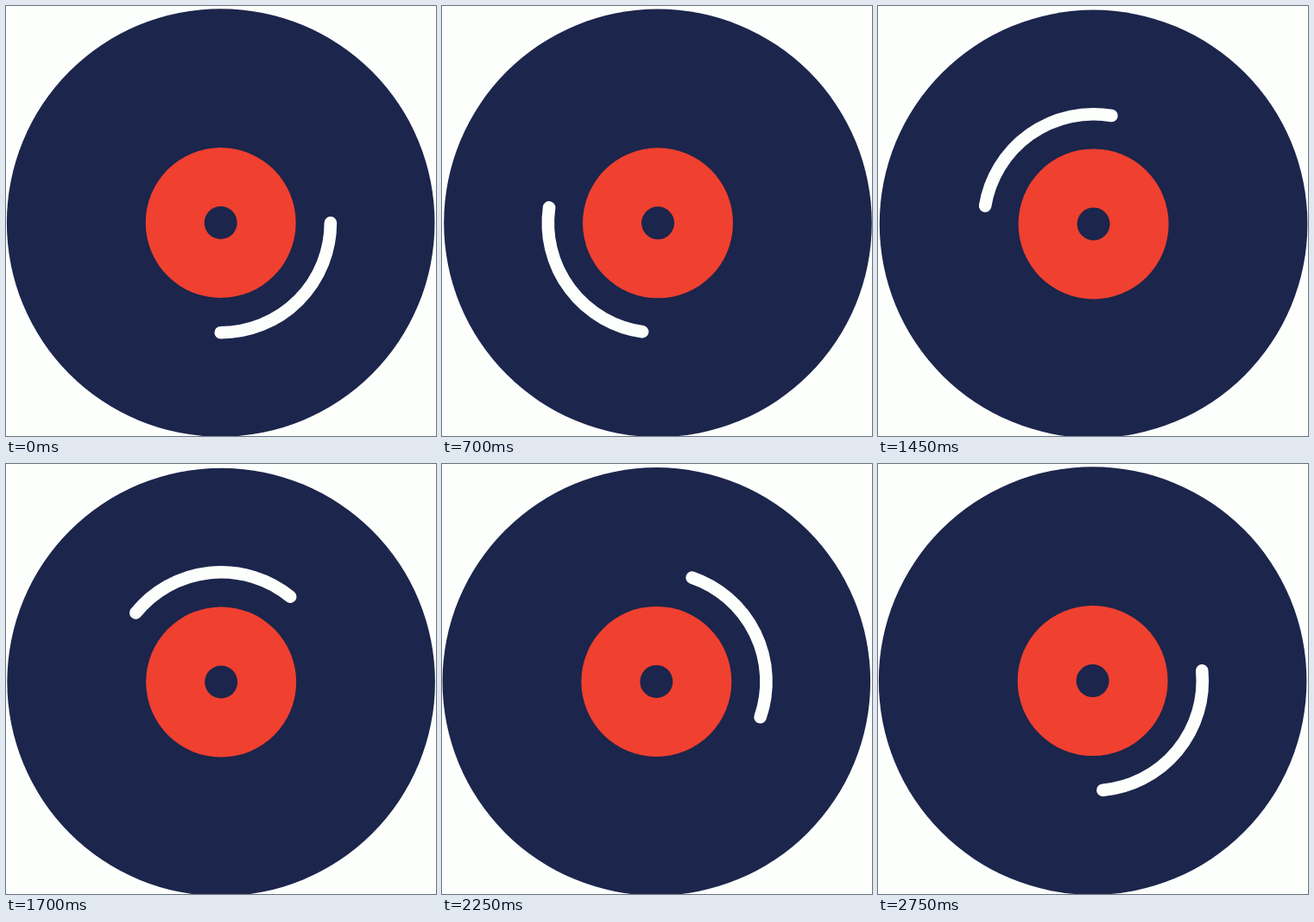
Recreate the animation shown at these times as an HTML page. Size 498x498 px, loop 2.8 s.

```html
<!DOCTYPE html>
<html lang="en">
<head>
<meta charset="utf-8">
<title>Spinning record</title>
<style>
  html, body { margin: 0; width: 100%; height: 100%; overflow: hidden; background: #fdfffd; }
  svg { display: block; width: 498px; height: 498px; }
</style>
</head>
<body>
<svg viewBox="0 0 498 498">
  <g id="record">
    <circle r="247.8" fill="#1c254b"/>
    <circle r="87" fill="#f04030"/>
    <circle r="19" fill="#1c254b"/>
    <path id="shine" d="M127.2 0A127.2 127.2 0 0 1 0 127.2" fill="none" stroke="#fdfffd" stroke-width="14.6" stroke-linecap="round"/>
  </g>
</svg>
<script>
const LOOP = 2800, STEP = 50;
const record = document.getElementById('record');
const shine = document.getElementById('shine');

// [ms, degrees]: the spin is slightly uneven
const spin = [[0, 0], [700, 98.1], [1200, 159.9], [1700, 219], [2000, 258],
  [2450, 313.7], [2750, 354.7], [LOOP, 360]];

function angleAt(t) {
  const i = spin.findIndex(([ms]) => ms > t);
  const [t0, a0] = spin[i - 1], [t1, a1] = spin[i];
  return a0 + (a1 - a0) * (t - t0) / (t1 - t0);
}

function draw(now) {
  const t = Math.floor((now % LOOP) / STEP) * STEP;
  const angle = angleAt(t);
  // the axle sits a little off centre, so the disc wobbles
  const wobble = (angle + 235) * Math.PI / 180;
  const x = 249.2 + 0.9 * Math.cos(wobble);
  const y = 251.7 + 0.8 * Math.sin(wobble);
  record.setAttribute('transform', `translate(${x} ${y})`);
  shine.setAttribute('transform', `rotate(${angle})`);
}

let start;
function tick(now) {
  start ??= now;
  draw(now - start);
  requestAnimationFrame(tick);
}
draw(0);
requestAnimationFrame(tick);
</script>
</body>
</html>
```
